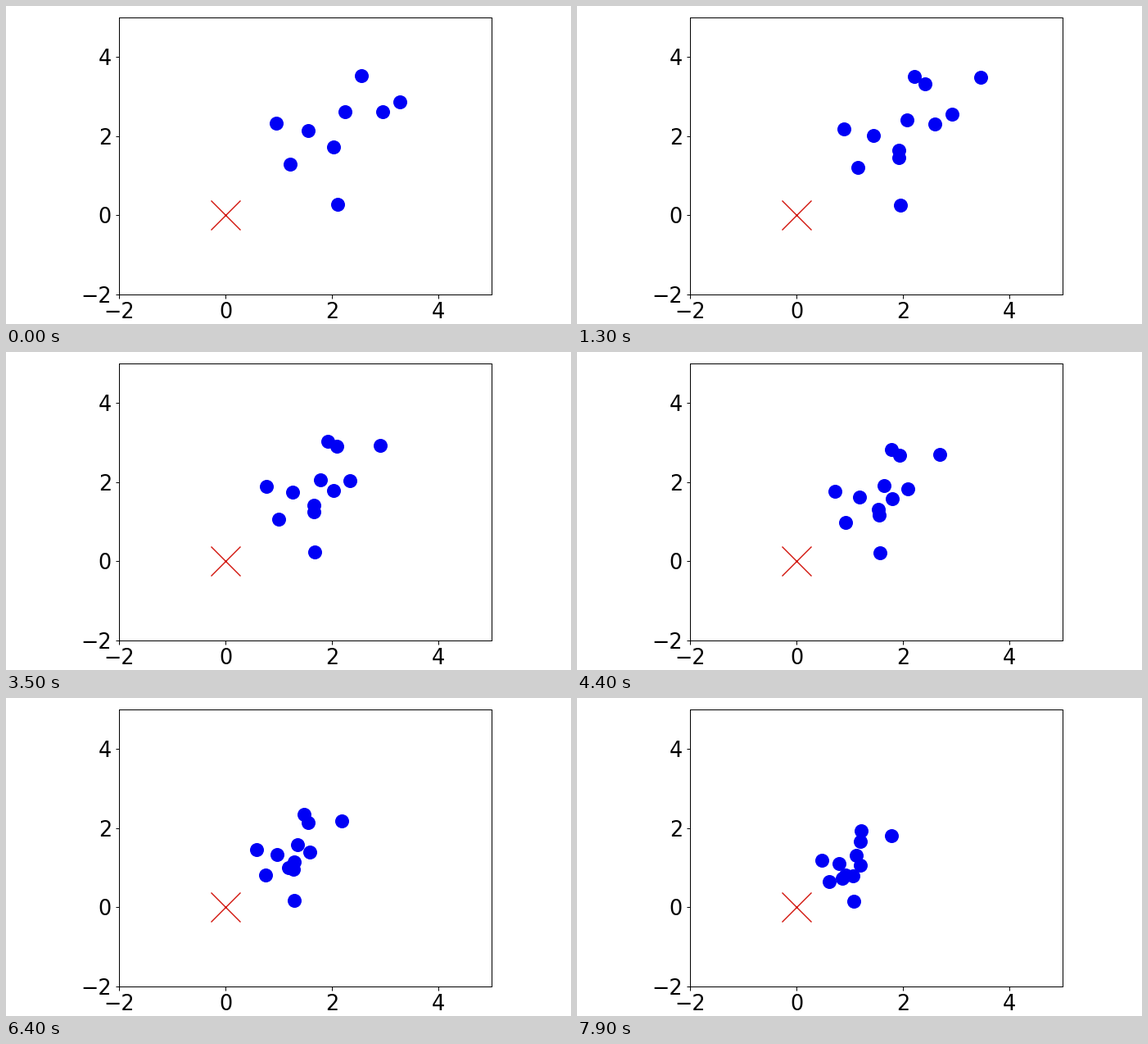
Recreate the animation shown at these times as a matplotlib script. Size 690x388 px, loop 8 s.

```python
import numpy as np
import matplotlib.pyplot as plt
from matplotlib.animation import FuncAnimation

W, H, DPI = 690, 388, 100
FRAMES, INTERVAL = 80, 100
PX = 72 / DPI  # points per pixel

# Start of each dot and how strongly the cross pulls it at first: x, y, pull
x, y, pull = np.array([
    (0.95, 2.32, 0.35), (1.22, 1.29, 0.34), (1.55, 2.14, 0.36),
    (2.03, 1.73, 0.27), (2.10, 0.28, 0.42), (2.25, 2.61, 0.45),
    (2.55, 3.52, 0.30), (3.27, 2.86, 0.66), (2.96, 2.61, 0.73),
    (2.38, 3.77, 0.40), (3.78, 3.80, 0.51), (2.07, 1.56, 0.40),
]).T
EARLY = 9  # the other dots join after the first frame

# Weakly pulled dots speed up more on the way.
gain = 0.029 / pull**2 - 0.095


def dots_at(i):
    u = i / (FRAMES - 1)
    scale = 1 - pull * u - gain * u**2
    pos = np.column_stack([x * scale, y * scale])
    return pos if i else pos[:EARLY]


fig = plt.figure(figsize=(W / DPI, H / DPI), dpi=DPI, facecolor="white")

left, right, top, bottom = 138, 593, 13.8, 351.8
ax = fig.add_axes([left / W, 1 - bottom / H, (right - left) / W, (bottom - top) / H])
ticks = range(-2, 5, 2)
ax.set(xlim=(-2, 5), ylim=(-2, 5), xticks=ticks, yticks=ticks)
ax.tick_params(labelsize=25.5 * PX, length=4.5 * PX, width=PX, pad=4.5 * PX,
               labelfontfamily="DejaVu Sans")
for spine in ax.spines.values():
    spine.set_linewidth(PX)

ax.plot(0, 0, "x", color="#d2140c", ms=35.5 * PX, mew=1.4 * PX)
dots = ax.scatter([], [], s=(17 * PX)**2, color="#0000f5", linewidths=0)


def update(i):
    dots.set_offsets(dots_at(i))
    return dots,


anim = FuncAnimation(fig, update, frames=FRAMES, interval=INTERVAL,
                     repeat=True, repeat_delay=0)
plt.show()
```
